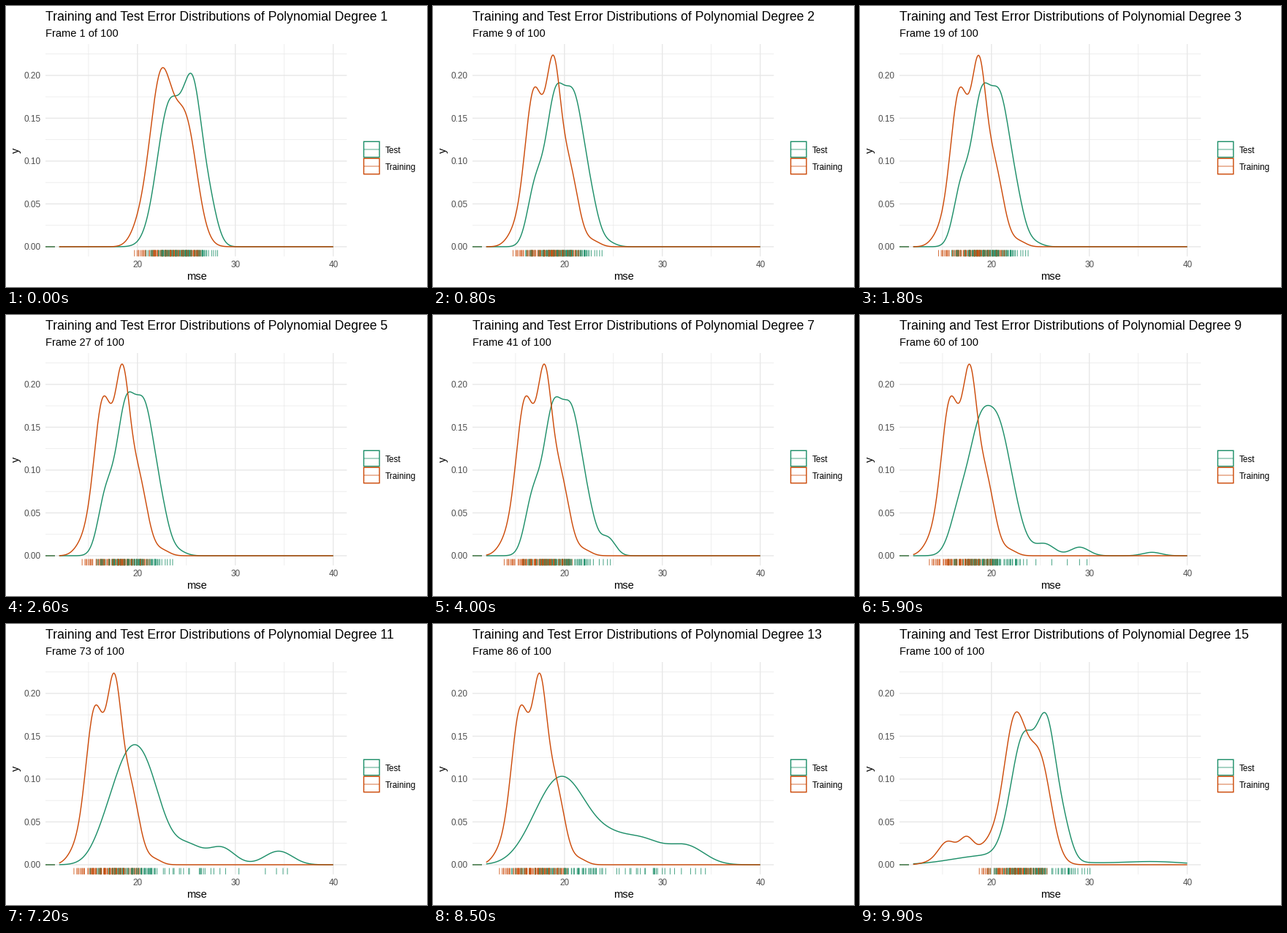
Recreate the animation shown at these times as a matplotlib script. Size 576 by 384 pixels, loop 10000 ms.

```python
import numpy as np
import matplotlib.pyplot as plt
from matplotlib.animation import FuncAnimation
from matplotlib.collections import LineCollection
from matplotlib.patches import Rectangle

plt.rcParams["font.family"] = "Liberation Sans"
W, H, FRAMES, DEGREES = 576, 384, 100, 15
GREEN, ORANGE = "#1c8e68", "#cc4a08"
PT = 0.72  # points per pixel at 100 dpi
LEFT, RIGHT, TOP, BOTTOM = 54, 466.3, 52, 342.2
X = np.linspace(12, 40, 420)
WIDE = np.linspace(10, 46, 1700)


def px(x):
    return LEFT + 13.39 * (np.asarray(x) - 10.6)


def py(y):
    return 329 - 1171 * np.asarray(y)


# Bumps are (weight, mean, sd); the training ones sit around its main peak
TRAIN_LINEAR = [(.04, 20.2, .9), (.56, 22.4, 1.15), (.4, 24.95, 1.15)]
TEST_LINEAR = [(.54, 23.3, 1.3), (.39, 25.7, .95), (.08, 27.4, .8)]
TRAIN_BODY = [(.025, -4.2, .8), (.43, -2.1, .95), (.32, -.15, .72),
              (.22, 1.4, .95), (.01, 4, .7)]
TEST_BODY = [(.13, 16.8, .8), (.38, 18.8, .95), (.4, 20.8, 1),
             (.08, 22.5, .8), (.01, 24.2, .8)]


def train_bumps(d):
    if d == 1:
        return TRAIN_LINEAR
    peak = np.interp(d, (2, 5, 7, 10, 14), (19, 18.6, 18.1, 17.9, 17.6))
    return [(w, peak + m, s) for w, m, s in TRAIN_BODY]


def test_bumps(d):
    """A steady body that blurs and loses weight to a tail as d grows."""
    if d == 1:
        return TEST_LINEAR

    def key(*values):
        return np.interp(d, (5, 7, 10, 14, 15), values)

    tail = [(key(0, .03, .03, .11, .1), key(24.5, 24.5, 25.6, 24.8, 26), .75),
            (key(0, 0, .025, .12, .06), key(29, 29, 29, 28, 30), .75),
            (key(0, 0, .01, .11, .19), key(36.4, 36.4, 36.4, 32.2, 36.5), .75)]
    rest = 1 - sum(w for w, _, _ in tail)
    shift = np.interp(d, (2, 5), (.2, -.05))
    blur = key(0, 0, .6, 1.75, 3)
    body = [(w * rest, m + shift, s) for w, m, s in TEST_BODY]
    return [(w, m, np.hypot(s, blur)) for w, m, s in body + tail]


def density(x, bumps):
    return sum(w / (s * np.sqrt(2 * np.pi)) * np.exp(-.5 * ((x - m) / s) ** 2)
               for w, m, s in bumps)


rng = np.random.default_rng(7)


def states(bumps):
    """Curve and rug points of every degree."""
    levels = rng.uniform(.012, .99, 100)
    out = []
    for d in range(1, DEGREES + 1):
        cdf = np.cumsum(density(WIDE, bumps(d)))
        out.append((density(X, bumps(d)),
                    np.interp(levels, cdf / cdf[-1], WIDE)))
    return out


TEST, TRAIN = states(test_bumps), states(train_bumps)


def pose(frame):
    """Current state, next state and eased progress between them."""
    k = max(j for j in range(DEGREES) if j * FRAMES // DEGREES <= frame)
    left = (k + 1) * FRAMES // DEGREES - frame
    t = max(0, 1 - left / 3)
    ease = 4 * t ** 3 if t < 0.5 else 1 - 4 * (1 - t) ** 3
    return k, (k + 1) % DEGREES, ease


fig = plt.figure(figsize=(W / 100, H / 100), dpi=100, facecolor="white")
ax = fig.add_axes([0, 0, 1, 1])
ax.set(xlim=(0, W), ylim=(H, 0))
ax.axis("off")


def text(x, y, s, size, color="black", **kw):
    return ax.text(x, y, s, fontsize=size * PT, color=color,
                   **{"va": "baseline", **kw})


def line(xs, ys, color, width, z=2, **kw):
    return ax.plot(xs, ys, color=color, lw=width * PT, zorder=z, snap=False,
                   solid_capstyle="butt", **kw)[0]


for v in (15, 20, 25, 30, 35, 40):
    major = v % 10 == 0
    line([px(v)] * 2, [TOP, BOTTOM], "#e8e8e8", 1.42 if major else .71, 1)
    if major:
        text(px(v) + .5, 357, str(v), 11.73, "#4d4d4d", ha="center")
for n in range(10):
    v, major = n * .025, n % 2 == 0
    line([LEFT, RIGHT], [py(v)] * 2, "#e8e8e8", 1.42 if major else .71, 1)
    if major:
        text(47.5, py(v) + 4.4, f"{v:.2f}", 11.73, "#4d4d4d", ha="right")

text(260.5, 374, "mse", 14.67, ha="center")
text(21, 197.5, "y", 14.67, ha="right", va="center", rotation=90)
for y, name, color in ((196, "Test", GREEN), (219, "Training", ORANGE)):
    ax.add_patch(Rectangle((489.5, y - 10.7), 21.4, 21.4, fill=False,
                           ec=color, lw=1.42 * PT, snap=False))
    line([489.5, 511], [y, y], color, 1.1, alpha=.7)
    text(519, y + 5, name, 11.73)

title = text(54, 20.4, "", 17.6)
subtitle = text(54, 42.4, "", 14.67)
line([LEFT, 67], [329, 329], "#2f6b35", 1.42, 3)
test_line = line([], [], GREEN, 1.42, 4)
train_line = line([], [], ORANGE, 1.42, 5)
rug = LineCollection([], linewidths=1.07 * PT, alpha=.75, zorder=3,
                     snap=False)
ax.add_collection(rug)


def draw(frame):
    k, nxt, t = pose(frame)
    title.set_text("Training and Test Error Distributions of "
                   f"Polynomial Degree {k + 1}")
    subtitle.set_text(f"Frame {frame + 1} of {FRAMES}")
    ticks = []
    for group, curve, color in ((TEST, test_line, GREEN),
                                (TRAIN, train_line, ORANGE)):
        dens, pts = (a + (b - a) * t for a, b in zip(group[k], group[nxt]))
        curve.set_data(px(X), py(dens))
        ticks.append([(x, color) for x in px(pts)])
    ticks = [p for pair in zip(*ticks) for p in pair if p[0] <= px(40)]
    rug.set_segments([[(x, 333.5), (x, BOTTOM)] for x, _ in ticks])
    rug.set_color([c for _, c in ticks])
    return title, subtitle, test_line, train_line, rug


anim = FuncAnimation(fig, draw, frames=FRAMES, interval=100, repeat=True,
                     repeat_delay=0, blit=False)
plt.show()
```
